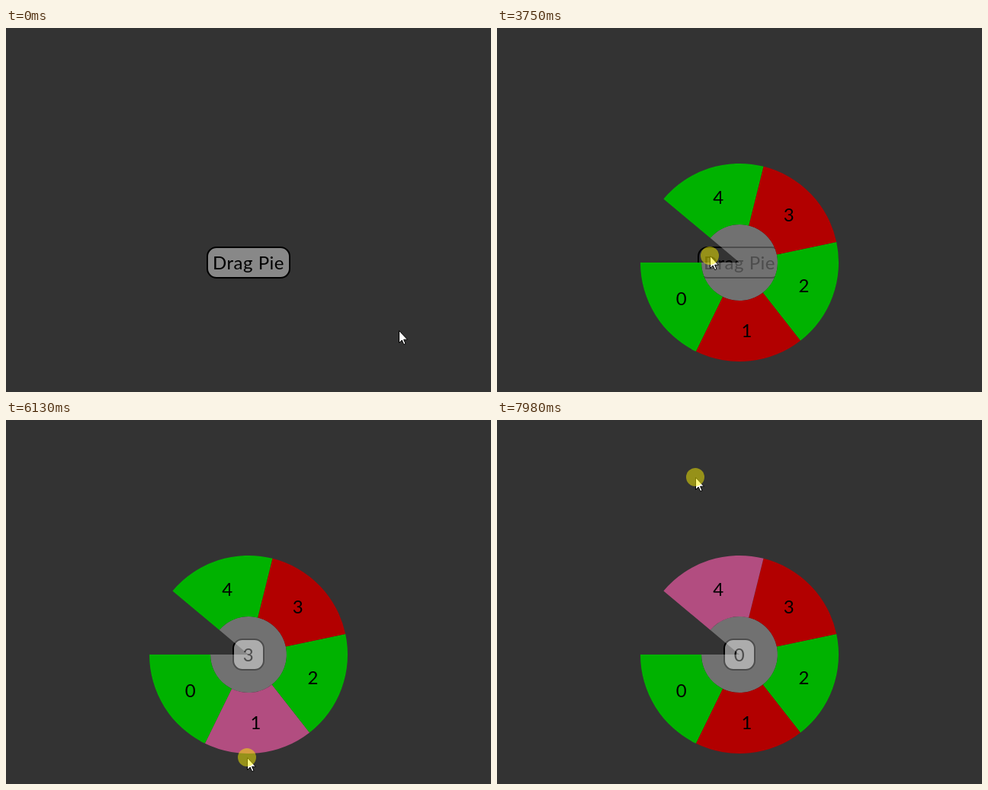
Recreate the animation shown at these times as an HTML page. Size 636 by 478 pixels, loop 8 s.

```html
<!DOCTYPE html>
<html lang="en">
<head>
<meta charset="utf-8">
<title>Drag pie menu</title>
<style>
  html, body { margin: 0; width: 100%; height: 100%; overflow: hidden; background: #333; }
  svg { display: block; width: 100vw; height: 100vh; }
  text { font: 24px Lato, "Open Sans", sans-serif; text-anchor: middle; fill: #000; }
  #caption { letter-spacing: .5px; }
</style>
</head>
<body>
<svg viewBox="0 0 636 478">
  <rect width="636" height="478" fill="#333"/>
  <rect id="button" y="288" height="40" rx="12" stroke="#000" stroke-width="2"/>
  <text id="caption" x="318" y="316.5"></text>
  <path id="hub" fill="#fff" fill-opacity=".3"/>
  <g id="slices"></g>
  <g id="labels"></g>
  <g id="pointer">
    <path d="M.5 .5V16.5L4.2 13 6.7 18.6 9 17.6 6.6 12.2H11.5Z" fill="#fff" stroke="#000" stroke-width="1"/>
    <circle id="touch" r="12" fill="#faf000" fill-opacity=".5"/>
  </g>
</svg>
<script>
const LOOP = 8000, TICK = 1000 / 13, PHASE = 205;
const CX = 318, CY = 308, INNER = 50, OUTER = 130;
const COUNT = 5, FULL = 320, OPEN_MS = 400, CLOSE_MS = 200;
const GREEN = "#00b200", RED = "#b20000", PINK = "#b24d80";

// Each gesture: press, first drag, release, caption after release
const gestures = [
  { down: 433, drag: 1200, up: 5280, caption: "3" },
  { down: 5670, drag: 5820, up: 6200, caption: "1" },
  { down: 6358, drag: 6590, up: 6970, caption: "0" },
  { down: 7130, drag: 7280, up: LOOP, caption: "4" }
];

// Pointer path: time, x, y
const path = [
  [50, 515, 397], [51, 508, 386], [133, 508, 386], [440, 345, 320],
  [1140, 345, 320], [1440, 385, 348], [1600, 385, 348], [1825, 385, 255],
  [1980, 300, 215], [2209, 191, 284], [2441, 222, 345], [2900, 250, 325],
  [3287, 285, 301], [3518, 222, 262], [3747, 279, 299], [4056, 190, 290],
  [4140, 190, 290], [4364, 230, 375], [4518, 320, 400], [4672, 400, 350],
  [4825, 425, 230], [4979, 414, 155], [5215, 414, 154], [5594, 355, 275],
  [5672, 335, 300], [6056, 318, 440], [6133, 316, 443], [6360, 302, 318],
  [6518, 302, 318], [6670, 295, 325], [6902, 240, 355], [7133, 310, 312],
  [7287, 345, 305], [7518, 522, 240], [7748, 400, 85], [7825, 340, 71],
  [7979, 260, 75]
];

const $ = id => document.getElementById(id);
const clamp = v => Math.min(1, Math.max(0, v));

function set(el, attrs) {
  for (const key in attrs) el.setAttribute(key, attrs[key]);
}

function add(parent, tag) {
  return parent.appendChild(document.createElementNS("http://www.w3.org/2000/svg", tag));
}

const slices = [], labels = [];
for (let i = 0; i < COUNT; i++) {
  slices.push(add($("slices"), "path"));
  labels.push(add($("labels"), "text"));
  labels[i].textContent = i;
}

// Degrees run from the left through the bottom
function polar(r, deg) {
  const a = deg * Math.PI / 180;
  return [CX - r * Math.cos(a), CY + r * Math.sin(a)];
}

function ring(r0, r1, from, to) {
  const big = to - from > 180 ? 1 : 0;
  return `M${polar(r0, from)}L${polar(r1, from)}A${r1} ${r1} 0 ${big} 0 ${polar(r1, to)}` +
    `L${polar(r0, to)}` + (r0 ? `A${r0} ${r0} 0 ${big} 1 ${polar(r0, from)}` : "") + "Z";
}

function pointerAt(t) {
  const next = path.findIndex(p => p[0] >= t);
  const i = next < 0 ? path.length - 1 : Math.max(1, next);
  const [t0, x0, y0] = path[i - 1], [t1, x1, y1] = path[i];
  const u = clamp((t - t0) / (t1 - t0));
  return [Math.round(x0 + (x1 - x0) * u), Math.round(y0 + (y1 - y0) * u)];
}

function stateAt(t) {
  const state = { caption: "Drag Pie", pressed: false, dragging: false, sweep: 0 };
  for (const g of gestures) {
    if (t < g.down) break;
    state.pressed = t < g.up;
    state.dragging = state.pressed && t >= g.drag;
    state.sweep = FULL * (state.pressed
      ? clamp((t - g.down) / OPEN_MS)
      : 1 - clamp((t - g.up) / CLOSE_MS));
    if (!state.pressed) state.caption = g.caption;
  }
  return state;
}

function render(time) {
  // The screen refreshes 13 times a second
  const t = Math.max(0, PHASE + 4 + TICK * Math.floor((time - PHASE) / TICK));
  const [x, y] = pointerAt(t);
  const { caption, pressed, dragging, sweep } = stateAt(t);
  const step = sweep / COUNT;

  const half = caption.length > 1 ? 54 : 20;
  const over = Math.abs(x - CX) <= half + 5 && Math.abs(y - CY) <= 25;
  set($("button"), { x: CX - half, width: 2 * half, fill: pressed && over ? "none" : "#888" });
  $("caption").textContent = caption;

  const angle = (Math.atan2(y - CY, CX - x) * 180 / Math.PI + 360) % 360;
  const hot = dragging && angle < sweep ? Math.floor(angle / step) : -1;
  const shown = sweep > 0 ? "visible" : "hidden";
  for (const id of ["hub", "slices", "labels"]) set($(id), { visibility: shown });
  set($("hub"), { d: ring(0, INNER, 0, sweep) });
  set($("labels"), { opacity: sweep / FULL });
  slices.forEach((slice, i) => {
    const [lx, ly] = polar((INNER + OUTER) / 2, (i + .5) * step);
    set(slice, {
      d: ring(INNER, OUTER, i * step, (i + 1) * step),
      fill: i === hot ? PINK : i % 2 ? RED : GREEN
    });
    set(labels[i], { x: lx, y: ly + 8.5 });
  });

  set($("pointer"), { transform: `translate(${x} ${y})` });
  set($("touch"), { visibility: pressed ? "visible" : "hidden" });
}

const start = performance.now();
function frame() {
  render((performance.now() - start) % LOOP);
  requestAnimationFrame(frame);
}
frame();
</script>
</body>
</html>
```
